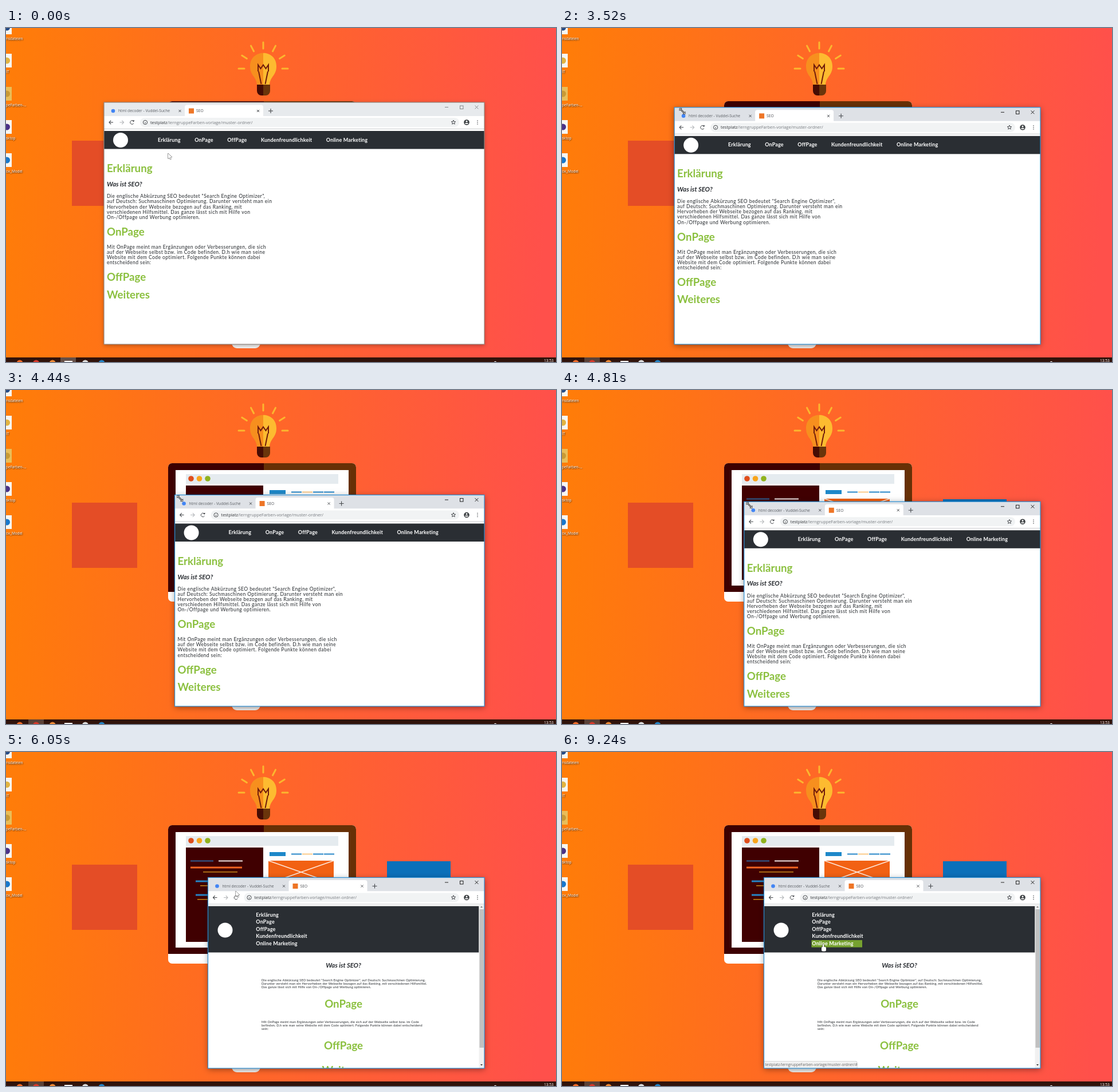
Animation, 960 px wide and 584 px high, one loop 9.7 s. Source, as an HTML page with a canvas:

```html
<!DOCTYPE html>
<html lang="de">
<head>
<meta charset="utf-8">
<title>Responsive Seite</title>
<style>
html, body { margin: 0; width: 100%; height: 100%; overflow: hidden; }
canvas { display: block; }
</style>
</head>
<body>
<canvas id="stage" width="960" height="584"></canvas>
<script>
const c = document.getElementById('stage').getContext('2d');
const LOOP = 9700, RIGHT = 835, BOTTOM = 553;
const CLICK = 3270, SETTLED = 5600;
const UI = '"Open Sans", sans-serif', WEB = 'Lato, sans-serif';
const GREEN = '#8bc03f', DARK = '#2a2e33', INK = '#45484c';
const HOST = 'testplatz', PATH = '/lerngruppeFarben-vorlage/muster-ordner/';
const LINKS = ['Erklärung', 'OnPage', 'OffPage', 'Kundenfreundlichkeit', 'Online Marketing'];
const ROW = 12.6, NAV_FONT = 'bold 9px ' + WEB;
const WIDE = {
  size: 8.6, step: 9.1, spacing: .41, before: 29, after: 23, between: 30.5,
  texts: [
    ['Die englische Abkürzung SEO bedeutet "Search Engine Optimizer",',
     'auf Deutsch: Suchmaschinen Optimierung. Darunter versteht man ein',
     'Hervorheben der Webseite bezogen auf das Ranking, mit',
     'verschiedenen Hilfsmittel. Das ganze lässt sich mit Hilfe von',
     'On-/Offpage und Werbung optimieren.'],
    ['Mit OnPage meint man Ergänzungen oder Verbesserungen, die sich',
     'auf der Webseite selbst bzw. im Code befinden. D.h wie man seine',
     'Website mit dem Code optimiert. Folgende Punkte können dabei',
     'entscheidend sein:']]
};
const SMALL = {
  size: 5.6, step: 6.25, spacing: .17, before: 34, after: 26.5, between: 42.5,
  texts: [
    ['Die englische Abkürzung SEO bedeutet "Search Engine Optimizer", auf Deutsch: Suchmaschinen Optimierung.',
     'Darunter versteht man ein Hervorheben der Webseite bezogen auf das Ranking, mit verschiedenen Hilfsmittel.',
     'Das ganze lässt sich mit Hilfe von On-/Offpage und Werbung optimieren.'],
    ['Mit OnPage meint man Ergänzungen oder Verbesserungen, die sich auf der Webseite selbst bzw. im Code',
     'befinden. D.h wie man seine Website mit dem Code optimiert. Folgende Punkte können dabei entscheidend',
     'sein:']]
};

// Key points: time, x, y
const CORNER = [[CLICK, 171, 130], [3910, 235, 152.5], [4440, 294.5, 183.5], [5260, 346, 209.5], [SETTLED, 352.5, 219.5]];
const APPROACH = [[70, 283, 219], [870, 171, 132]];
const BROWSE = [[SETTLED, 353, 221], [6050, 401, 243], [6370, 430, 277], [7400, 456, 327], [8030, 456, 336]];

function at(keys, t) {
  const i = keys.findIndex(k => k[0] > t);
  if (i < 0) return keys.at(-1).slice(1);
  if (i === 0) return keys[0].slice(1);
  const p = keys[i - 1], q = keys[i], u = (t - p[0]) / (q[0] - p[0]);
  return [1, 2].map(j => p[j] + (q[j] - p[j]) * u);
}

// While dragging, the pointer runs slightly ahead of the window corner.
function pointerAt(t) {
  if (t < 870) return at(APPROACH, t);
  if (t >= SETTLED) return at(BROWSE, t);
  const [x, y] = at(CORNER, t + 130);
  return [x + 1, y + 2];
}

function rect(x, y, w, h, color) {
  c.fillStyle = color;
  c.fillRect(x, y, w, h);
}

function round(x, y, w, h, r, color) {
  c.fillStyle = color;
  c.beginPath();
  c.roundRect(x, y, w, h, r);
  c.fill();
}

function dot(x, y, r, color) {
  c.fillStyle = color;
  c.beginPath();
  c.arc(x, y, r, 0, 7);
  c.fill();
}

function path(points, close) {
  c.beginPath();
  for (let i = 0; i < points.length; i += 2) c.lineTo(points[i], points[i + 1]);
  if (close) c.closePath();
}

function line(points, color, width = 1) {
  path(points);
  c.strokeStyle = color;
  c.lineWidth = width;
  c.stroke();
}

function arc(x, y, r, from, to) {
  c.beginPath();
  c.arc(x, y, r, from, to);
  c.strokeStyle = INK;
  c.lineWidth = 1;
  c.stroke();
}

function triangle(x, y, w, h, color) {
  path([x - w, y, x + w, y, x, y + h], true);
  c.fillStyle = color;
  c.fill();
}

function cross(x, y, rx, ry, color, width) {
  line([x - rx, y - ry, x + rx, y + ry], color, width);
  line([x + rx, y - ry, x - rx, y + ry], color, width);
}

function text(s, x, y, font, color, spacing = 0, align = 'left') {
  c.font = font;
  c.fillStyle = color;
  c.letterSpacing = spacing + 'px';
  c.textAlign = align;
  c.fillText(s, x, y);
  return c.measureText(s).width;
}

function bulb() {
  c.lineCap = 'round';
  for (let i = 0; i < 7; i++) {
    const x = Math.cos(i * Math.PI / 6), y = -Math.sin(i * Math.PI / 6);
    line([449 + 33 * x, 71 + 35 * y, 449 + 43 * x, 71 + 46 * y], '#fbb72f', 3);
  }
  c.lineCap = 'butt';
  for (const [x, glass, base] of [[420, '#f78f1e', '#460c04'], [449, '#fdbb30', '#6a350b']]) {
    c.save();
    c.beginPath();
    c.rect(x, 40, 29, 80);
    c.clip();
    c.fillStyle = glass;
    c.beginPath();
    c.moveTo(438, 99);
    c.bezierCurveTo(437, 85, 426, 83, 426, 67);
    c.bezierCurveTo(426, 36, 472, 36, 472, 67);
    c.bezierCurveTo(472, 83, 461, 85, 460, 99);
    c.fill();
    round(438, 99, 23, 19, [0, 0, 8, 8], base);
    c.restore();
  }
  const zigzag = [];
  for (let i = 0; i < 5; i++) zigzag.push(440 + i * 4.5, i % 2 ? 71 : 64.5);
  line([440, 76, ...zigzag, 458, 76], '#701c0b', 2);
  for (const side of [-1, 1]) line([449 + side * 8, 76, 449 + side * 3.5, 98], '#701c0b', 2);
}

function monitor() {
  const blue = '#2585c7', gold = '#c98a1b';
  round(283, 128, 328, 242, 7, '#fff');
  round(283, 128, 167, 225, [7, 0, 0, 0], '#3d0001');
  round(450, 128, 161, 225, [0, 7, 0, 0], '#673006');
  rect(296, 140, 302, 202, '#fff');
  rect(314, 147, 266, 17, '#e5ebef');
  ['#df4d1c', '#f8a51c', '#90b31d'].forEach((k, i) => dot(323 + i * 14.5, 155, 4.8, k));
  rect(314, 167, 135, 165, '#400001');
  rect(322, 189.5, 40, 2, '#2e5f94');
  rect(371, 189.5, 42, 2, '#f0e8e8');
  for (let i = 0; i < 3; i++) {
    const x = i ? 331 : 322, y = 202 + i * 24;
    rect(x, y - 1.5, 412 - x, 3, i ? blue : '#f26522');
    rect(344 - i * 5, y + 7, 60, 1.5, gold);
  }
  rect(460, 175, 28, 7, '#1e88c9');
  for (let i = 0; i < 4; i++) rect(498 + i * 19, 177.5, 18, 2, i === 1 ? '#fbc987' : blue);
  rect(458, 190, 114, 40, '#f26113');
  cross(515, 210, 57, 20, '#ffe9dc', 1.4);
  round(394, 540, 50, 20, [0, 0, 9, 9], '#f5f3f2');
}

function icons() {
  const badges = ['#244b86', '#e2b441', '#c99a35', '#4a3288', '#1878cc'];
  const labels = ['nsdateien', 'IT', 'peFarben-...', 'sktop', 'ox_Model'];
  labels.forEach((s, i) => {
    const y = i * 58;
    rect(0, y - 13, 10, 24, i === 2 ? '#e9bd58' : '#f7f6f2');
    dot(1.5, y - 1, 5.5, badges[i]);
    c.save();
    c.shadowColor = '#000';
    c.shadowBlur = 2;
    c.shadowOffsetX = c.shadowOffsetY = .6;
    text(s, 0, y + 21, '6.4px ' + UI, '#fff');
    c.restore();
  });
}

function taskbar(focused) {
  rect(0, 576, 960, 8, '#30130b');
  rect(focused ? 39 : 95, 576, 27, 8, focused ? '#5b4238' : '#665048');
  ['#f26b28', '#d8392b', '#f08a36', '#fff', '#ddd', '#2383c5'].forEach((k, i) => {
    if (i === 3) rect(102, 582, 14, 2, k);
    else dot(24 + i * 28.6, 586, 5.5, k);
  });
  dot(854, 585, 2.2, '#eee');
  text('13:53', 939, 584, '6.6px ' + UI, '#fff');
}

function desktop(focused) {
  const g = c.createLinearGradient(0, 0, 960, 60);
  g.addColorStop(0, '#ff7d08');
  g.addColorStop(.5, '#ff6629');
  g.addColorStop(1, '#ff504b');
  rect(0, 0, 960, 584, g);
  bulb();
  monitor();
  rect(115, 197, 114, 114, '#e44d26');
  rect(665, 191, 111, 111, '#0b70ba');
  icons();
  taskbar(focused);
}

function arrowIcon(x, dir, color) {
  line([x - 3.5, 35, x + 3.5, 35], color, 1.1);
  line([x + dir * .3, 31.7, x + dir * 3.5, 35, x + dir * .3, 38.3], color, 1.1);
}

function star(x, y) {
  const points = [];
  for (let i = 0; i < 10; i++) {
    const a = i * Math.PI / 5, r = i % 2 ? 1.7 : 3.9;
    points.push(x + r * Math.sin(a), y - r * Math.cos(a));
  }
  path(points, true);
  c.stroke();
}

// Drawn from the window's corner; right is where right-aligned parts end.
function chrome(w, right, focused) {
  const control = focused ? '#222' : '#85888b';
  rect(0, 0, w, 24, focused ? '#dee1e6' : '#e7eaed');
  round(141, 4.5, 137, 20, [4, 4, 0, 0], '#fff');
  rect(0, 24, w, 23, '#fff');
  dot(16, 15, 3.3, '#4285f4');
  rect(148, 10.5, 9, 9, '#ee7526');
  text('html decoder - Vuddel-Suche', 25, 17.3, '6.7px ' + UI, '#5b5f64');
  text('SEO', 161, 17.3, '6.7px ' + UI, '#4a4d52');
  cross(132.5, 15, 2, 2, INK);
  cross(269, 15, 2, 2, INK);
  line([287, 15, 295, 15], INK, 1.1);
  line([291, 11, 291, 19], INK, 1.1);
  line([right - 69, 8.5, right - 63, 8.5], control);
  c.strokeRect(right - 42.5, 6, 5.5, 5.5);
  cross(right - 13.5, 8.5, 2.9, 2.9, control);

  round(63, 27, right - 107, 16, 8, '#f1f3f4');
  arrowIcon(12.5, -1, INK);
  arrowIcon(31, 1, '#b4b7ba');
  arc(49, 35, 3.3, .5, 5.5);
  triangle(51.5, 31.5, 2, 3, INK);
  arc(72, 35, 3.6, 0, 7);
  line([72, 34.5, 72, 37], INK);
  const hostWidth = text(HOST, 81, 37.6, '7.4px ' + UI, '#33363a');
  text(PATH, 81 + hostWidth, 37.6, '7.4px ' + UI, '#767a7f');
  star(right - 54, 35);
  dot(right - 31, 35, 4.8, '#3c4043');
  dot(right - 31, 33.3, 1.5, '#fff');
  round(right - 33.7, 36, 5.4, 2, 1, '#fff');
  for (let i = -1; i < 2; i++) dot(right - 12, 35 + i * 3, .8, INK);
  rect(0, 46, w, 1, '#c9cbcd');
}

// Flows the article downwards from the baseline of its first subheading.
function article(style, x, y, align) {
  const left = align === 'center' ? x - 143 : x;
  const heading = s => text(s, x, y, 'bold 18.7px ' + WEB, GREEN, 0, align);
  const paragraph = lines => {
    lines.forEach((s, i) =>
      text(s, left, y + i * style.step, style.size + 'px ' + WEB, '#25292d', style.spacing));
    y += (lines.length - 1) * style.step;
  };
  text('Was ist SEO?', x, y, 'italic bold 11.2px ' + WEB, '#25292e', 0, align);
  y += style.after - 2.7;
  paragraph(style.texts[0]);
  y += style.before;
  heading('OnPage');
  y += style.after;
  paragraph(style.texts[1]);
  y += style.before;
  heading('OffPage');
  y += style.between;
  heading('Weiteres');
}

function widePage(w) {
  rect(0, 50, w, 31.5, DARK);
  dot(29, 66, 13, '#fff');
  let x = 94;
  for (const s of LINKS) x += text(s, x, 68.6, NAV_FONT, '#fff', .15) + 24.5;
  text('Erklärung', 5, 122.3, 'bold 18.7px ' + WEB, GREEN);
  article(WIDE, 5, 147, 'left');
}

function smallPage(w, h, hover) {
  const pageWidth = w - 9.5, view = h - 50, middle = pageWidth + 4.5;
  rect(0, 50, pageWidth, 81, DARK);
  dot(30, 92, 13, '#fff');
  if (hover >= 0) rect(83, 59 + hover * ROW, 88.5, ROW, '#76a12f');
  LINKS.forEach((s, i) => text(s, 83.8, 68 + i * ROW, NAV_FONT, '#fff', .15));
  article(SMALL, pageWidth / 2, 157.5, 'center');

  rect(pageWidth, 47, 9.5, h, '#f1f1f1');
  rect(pageWidth + 1, 55.5, 7.5, (view - 18) * view / 311, '#c1c1c1');
  triangle(middle, 52.5, 2, -2.5, '#777');
  triangle(middle, h - 7, 2, 2.5, '#333');
}

function statusBubble(h, full) {
  round(0, h - 12.5, 163, 13, [0, 3, 0, 0], '#c8c8c8');
  round(0, h - 11.8, 162.3, 13, [0, 3, 0, 0], '#f2f2f2');
  const url = HOST + PATH;
  text(full ? url + '#' : url.slice(0, -1) + '…', 2, h - 4, '6.5px ' + UI, '#666');
}

function browser(x, y, focused, hover, t) {
  const w = RIGHT - x, h = BOTTOM - y;
  // The last drag steps show the content slightly too wide.
  const right = t >= 5260 && t < 5410 ? w + 3.5 : w;
  c.save();
  c.translate(x, y);
  c.save();
  c.shadowColor = focused ? 'rgba(0,0,0,.42)' : 'rgba(0,0,0,.3)';
  c.shadowBlur = focused ? 10 : 7;
  c.shadowOffsetY = 2;
  rect(0, 0, w, h, '#fff');
  c.restore();
  c.save();
  c.beginPath();
  c.rect(0, 0, w, h);
  c.clip();
  chrome(w, right, focused);
  if (w > 512) widePage(w);
  else smallPage(right, h, hover);
  if (hover >= 0) statusBubble(h, t >= 9240);
  c.restore();
  c.strokeStyle = focused ? '#2b8fd6' : '#92867f';
  c.lineWidth = 1.2;
  c.strokeRect(0, 0, w, h);
  c.restore();
}

function pointer(x, y, kind) {
  c.save();
  c.translate(x, y);
  c.strokeStyle = '#222';
  c.fillStyle = '#fff';
  c.lineWidth = .9;
  if (kind === 'resize') {
    line([-4, -4, 4, 4], '#222', 2.6);
    line([-4, -4, 4, 4], '#fff', 1);
    for (const s of [-1, 1]) {
      path([5 * s, 5 * s, s, 5 * s, 5 * s, s], true);
      c.fill();
      line([5 * s, 5 * s, s, 5 * s, 5 * s, s, 5 * s, 5 * s], '#222', .8);
    }
  } else {
    c.beginPath();
    if (kind === 'hand') {
      c.roundRect(-3, 4.5, 8, 8, 2.5);
      c.stroke();
      c.roundRect(-1, 0, 2, 8, 1);
      c.stroke();
    } else {
      path([0, 0, 0, 9.5, 2.1, 7.6, 3.6, 11, 5.1, 10.3, 3.6, 7, 6.5, 6.7], true);
      c.stroke();
    }
    c.fill();
  }
  c.restore();
}

function draw(t) {
  const focused = t >= CLICK;
  const [x, y] = at(CORNER, t), [px, py] = pointerAt(t);
  const row = Math.floor((py - y - 59) / ROW);
  const hover = t >= 6440 && px > x + 83 && row >= 0 && row < LINKS.length ? row : -1;
  const resize = t >= 870 && t < 1780 || t >= 2880 && t < SETTLED;
  desktop(focused);
  browser(x, y, focused, hover, t);
  pointer(px, py, resize ? 'resize' : hover >= 0 ? 'hand' : 'arrow');
}

const start = performance.now();
(function tick() {
  draw((performance.now() - start) % LOOP);
  requestAnimationFrame(tick);
})();
</script>
</body>
</html>
```
